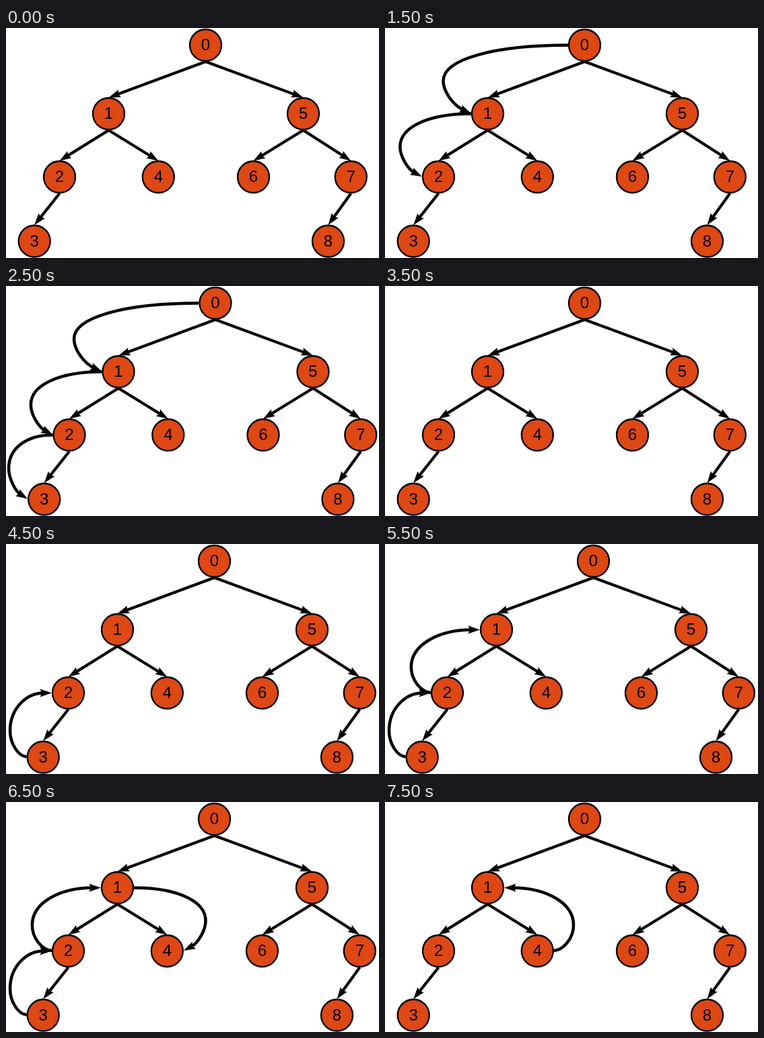
An HTML page with a canvas that plays this animation: 554x342 px, repeating every 8 s.

```html
<!DOCTYPE html>
<html lang="en">
<head>
<meta charset="utf-8">
<title>Depth-first traversal</title>
<style>
html, body { margin: 0; width: 100%; height: 100%; overflow: hidden; background: #fff; }
canvas { display: block; }
</style>
</head>
<body>
<canvas id="stage" width="554" height="342"></canvas>
<script>
const ctx = document.getElementById('stage').getContext('2d');
const RADIUS = 24.5;

// The tree: parent and x of each node; y follows from the depth
const parent = [-1, 0, 1, 2, 1, 0, 5, 5, 7];
const columns = [296.5, 152.5, 79.5, 42.2, 226.3, 441.5, 367.5, 512.3, 478.5];
const rows = [25.5, 127.5, 221.5, 317];
const depth = i => i ? 1 + depth(parent[i]) : 0;
const nodes = columns.map((x, i) => ({ x, y: rows[depth(i)] }));

// Nodes joined by curved arrows in each one-second step
const trails = ['0', '01', '012', '0123', '3', '32', '321', '3214', '41'];

// Draws a line or chained Bezier curves through [x, y] points, with a head at the end
function arrow(points, width) {
  const [control, tip] = points.slice(-2);
  const angle = Math.atan2(tip[1] - control[1], tip[0] - control[0]);
  const base = [tip[0] - 12 * Math.cos(angle), tip[1] - 12 * Math.sin(angle)];
  const path = [...points.slice(0, -1), base];

  ctx.lineWidth = width;
  ctx.beginPath();
  ctx.moveTo(...path[0]);
  if (path.length === 2) ctx.lineTo(...base);
  else for (let i = 1; i < path.length; i += 3) ctx.bezierCurveTo(...path.slice(i, i + 3).flat());
  ctx.stroke();

  ctx.save();
  ctx.translate(...tip);
  ctx.rotate(angle);
  ctx.fillStyle = '#000';
  ctx.beginPath();
  ctx.moveTo(0, 0);
  ctx.lineTo(-17.5, -6);
  ctx.quadraticCurveTo(-14, 0, -17.5, 6);
  ctx.fill();
  ctx.restore();
}

function edge(from, to) {
  arrow([[from.x, from.y + RADIUS], [to.x, to.y - RADIUS + 0.5]], 4.2);
}

// Curve that bulges outwards between the sides of two nodes
function hop(from, to) {
  const down = to.y > from.y;
  const [top, low] = down ? [from, to] : [to, from];
  const side = Math.sign(low.x - top.x);
  const x1 = top.x + side * RADIUS, x2 = low.x + side * RADIUS;
  const bulge = side * ((down ? 23.5 : 20) + Math.abs(x2 - x1) / 8);
  const far = x2 + bulge;
  const middle = top.y + (low.y - top.y) * (down ? 0.52 : 0.59);
  const drop = low.y - middle;
  const [bend, pull, lift] = down ? [0.33, 0.64, 0.25] : [0.5, 0.5, 0.04];
  const points = [
    [x1, top.y], [x1 + (far - x1) * 0.6, top.y],
    [far, middle - (middle - top.y) * 0.6], [far, middle], [far, middle + drop * bend],
    [x2 + bulge * pull, low.y - drop * lift], [x2, low.y - 0.5]
  ];
  arrow(down ? points : points.reverse(), 4.5);
}

function disc({ x, y }, label) {
  ctx.beginPath();
  ctx.arc(x, y, 23.5, 0, 2 * Math.PI);
  ctx.fillStyle = '#dd4814';
  ctx.fill();
  ctx.lineWidth = 2.3;
  ctx.stroke();
  ctx.fillStyle = '#000';
  ctx.fillText(label, x, y + 7.5);
}

function draw() {
  const time = performance.now() % 8000;
  const trail = trails[Math.floor((time + 500) / 1000)];
  // The tree moves right to make room for the leftmost curve
  const shift = trail.includes('23') ? 14.5 : trail.includes('32') ? 13 : 0;

  ctx.setTransform(1, 0, 0, 1, 0, 0);
  ctx.fillStyle = '#fff';
  ctx.fillRect(0, 0, 554, 342);
  ctx.translate(shift, 0);
  ctx.strokeStyle = '#000';
  ctx.font = '24px "Liberation Sans", Arial, sans-serif';
  ctx.textAlign = 'center';

  nodes.slice(1).forEach((node, i) => edge(nodes[parent[i + 1]], node));
  for (let i = 1; i < trail.length; i++) hop(nodes[trail[i - 1]], nodes[trail[i]]);
  nodes.forEach(disc);
  requestAnimationFrame(draw);
}
draw();
</script>
</body>
</html>
```
